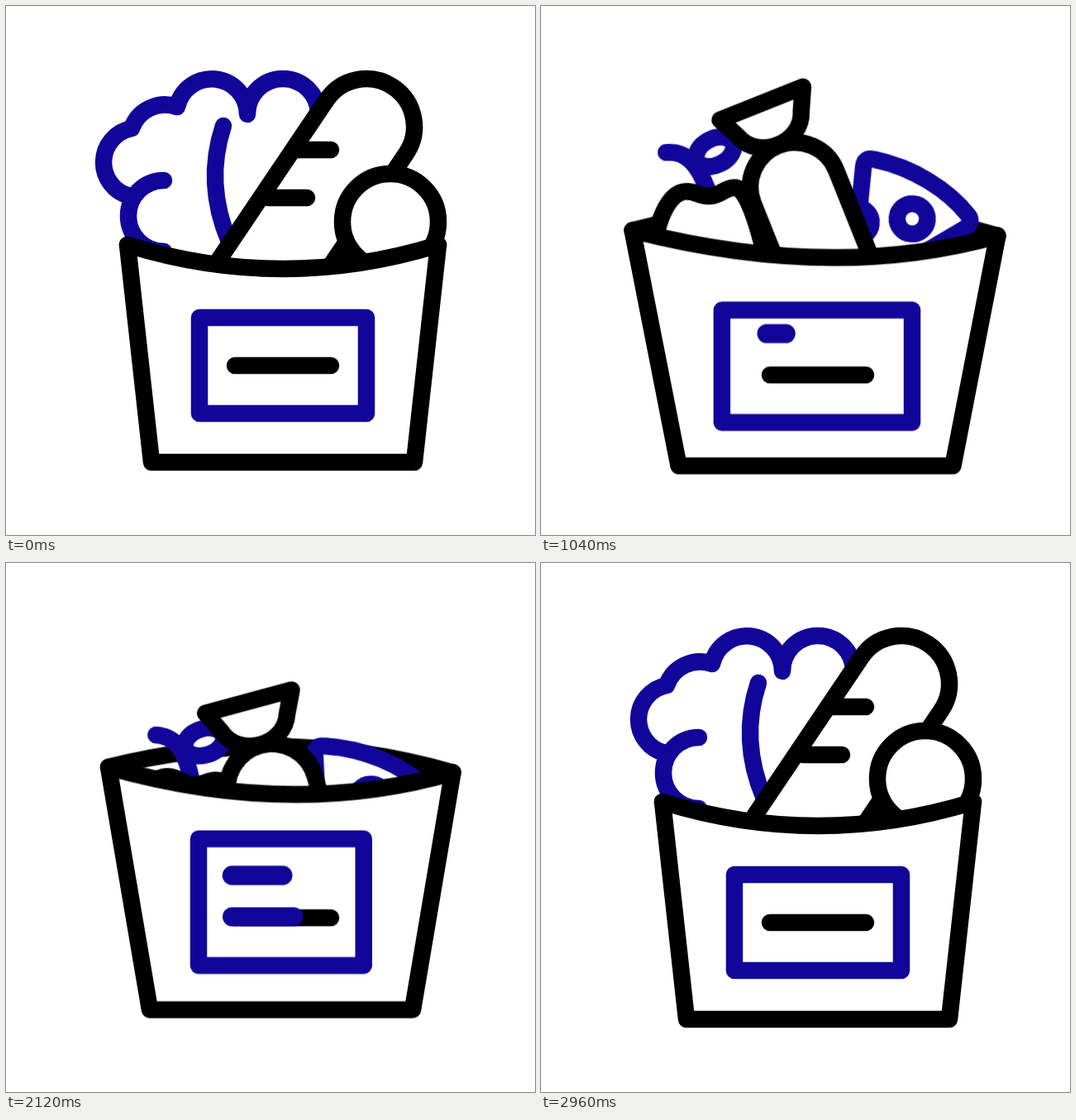
Animation of 640 by 640 pixels, one loop 3 s. Source, as an HTML page without scripts:

```html
<!DOCTYPE html>
<html lang="en">
<head>
<meta charset="utf-8">
<title>Shopping bag</title>
<style>
html, body { margin: 0; width: 100%; height: 100%; overflow: hidden; background: #fff; }
svg { display: block; width: 100%; height: 100%; }
svg * { animation: 3s linear infinite; }
.ink, .blue { fill: #fff; stroke: #000; stroke-width: 20.5; stroke-linecap: round; stroke-linejoin: round; }
.blue { stroke: #110699; }
.open { fill: none; }

/* Bag: vertical hop; everything inside is measured from its base */
.hop { animation-name: hop; }
@keyframes hop {
  0%, 6.667%, 98.667%, 100% { transform: translateY(552px); }
  6.667% { animation-timing-function: cubic-bezier(.3, .3, .5, 1); }
  16% { transform: translateY(517px); animation-timing-function: cubic-bezier(.5, .1, .7, .7); }
  26.667% { transform: translateY(543px); animation-timing-function: cubic-bezier(.2, .5, .5, 1); }
  43.333% { transform: translateY(560px); }
  45.333% { transform: translateY(559px); animation-timing-function: ease-in-out; }
  58.667% { transform: translateY(546px); }
  62.667% { transform: translateY(545px); animation-timing-function: ease-in-out; }
  78.667% { transform: translateY(536px); animation-timing-function: ease-in-out; }
}
.front { animation-name: front; }
@keyframes front {
  0%, 6.667%, 98.667%, 100% { d: path("M147 -263Q335 -205 523 -263L494 0L176 0Z"); }
  6.667% { animation-timing-function: ease-out; }
  16% { d: path("M109 -272Q350 -212 555 -264L503 0L162 0Z"); }
  22.667% { d: path("M104 -274Q350 -213 559 -266L504 0L161 0Z"); }
  26.667% { d: path("M106 -275Q350 -213 557 -267L503 0L162 0Z"); animation-timing-function: ease-in-out; }
  45.333% { d: path("M118 -301Q360 -238 545 -297L491 0L174 0Z"); }
  58.667%, 62.667% { d: path("M118 -301Q350 -239 545 -294L491 0L174 0Z"); }
  78.667% { d: path("M130 -286Q343 -223 536 -280L493 0L174 0Z"); animation-timing-function: ease-out; }
}
.back { animation-name: back; }
@keyframes back {
  0%, 6.667%, 98.667%, 100% { d: path("M147 -263Q335 -205 523 -263"); }
  6.667% { animation-timing-function: ease-out; }
  16% { d: path("M109 -272Q332 -334 555 -264"); }
  22.667% { d: path("M104 -274Q334 -338 559 -266"); }
  26.667% { d: path("M106 -275Q336 -339 557 -267"); animation-timing-function: ease-in-out; }
  45.333% { d: path("M118 -301Q332 -349 545 -297"); }
  58.667%, 62.667% { d: path("M118 -301Q332 -348 545 -294"); }
  78.667% { d: path("M130 -286Q333 -345 536 -280"); animation-timing-function: ease-out; }
}

/* Label */
.label { animation-name: label; }
@keyframes label {
  0%, 6.667%, 98.667%, 100% { x: 234px; y: -175px; width: 202px; height: 116px; }
  6.667% { animation-timing-function: ease-out; }
  16% { x: 210.5px; y: -169px; width: 249px; height: 116px; }
  26.667% { x: 210.5px; y: -172px; width: 249px; height: 119.5px; animation-timing-function: ease-in-out; }
  45.333%, 62.667% { x: 232.5px; y: -215.5px; width: 199.5px; height: 163px; }
  78.667% { x: 233.5px; y: -198px; width: 200px; height: 143.5px; }
}
.dash { animation-name: dash; }
@keyframes dash {
  0%, 6.667%, 98.667%, 100% { transform: translateY(-117px); }
  16% { transform: translateY(-111px); }
  26.667%, 62.667% { transform: translateY(-110px); }
  78.667% { transform: translateY(-112.5px); }
}
.row1 { animation-name: row1; }
@keyframes row1 {
  0%, 32% { d: path("M273 -160H273"); stroke-width: 0; }
  33.333% { stroke-width: 23; }
  45.333% { d: path("M273 -160H388"); }
  49.333%, 62.667% { d: path("M273 -160H394"); stroke-width: 23; }
  78.667% { d: path("M274 -165H276"); stroke-width: 24; }
  80%, 100% { d: path("M274 -165H274"); stroke-width: 0; }
}
.row2 { animation-name: row2; }
@keyframes row2 {
  0%, 34.667% { d: path("M273 -112H273"); stroke-width: 0; }
  36% { stroke-width: 23; }
  45.333% { d: path("M273 -112H359"); }
  50.667%, 62.667% { d: path("M273 -112H394"); stroke-width: 23; }
  78.667% { d: path("M274 -113H302"); stroke-width: 23; }
  81.333%, 100% { d: path("M274 -113H274"); stroke-width: 0; }
}

/* First shopping: lettuce, bread, roll */
.lettuce { animation-name: lettuce; }
@keyframes lettuce {
  0%, 6.667%, 98.667%, 100% { transform: none; visibility: visible; }
  6.667% { animation-timing-function: cubic-bezier(.35, .2, .7, .7); }
  16% { transform: translate(22px, 88px); visibility: visible; }
  21.333%, 78.667% { transform: translate(43px, 205px); visibility: hidden; }
  78.667% { animation-timing-function: cubic-bezier(.2, .6, .4, 1); }
}
.bread { transform-origin: 436px 146px; animation-name: bread; }
@keyframes bread {
  0%, 6.667%, 98.667%, 100% { transform: translate(0, 0) rotate(0deg); visibility: visible; }
  6.667% { animation-timing-function: cubic-bezier(.35, .2, .7, .7); }
  16% { transform: translate(-34px, 74px) rotate(-5deg); visibility: visible; }
  21.333%, 77.333% { transform: translate(-90px, 205px) rotate(-12deg); visibility: hidden; }
  78.667% { transform: translate(-84px, 187px) rotate(-11deg); visibility: visible; animation-timing-function: cubic-bezier(.2, .6, .4, 1); }
}
.roll { animation-name: roll; }
@keyframes roll {
  0%, 6.667%, 98.667%, 100% { transform: none; visibility: visible; }
  16% { transform: translate(-4px, 14px); visibility: visible; animation-timing-function: ease-in; }
  21.333%, 78.667% { transform: translate(-10px, 110px); visibility: hidden; }
  78.667% { animation-timing-function: cubic-bezier(.2, .6, .4, 1); }
}

/* Second shopping: pizza, apple, sausage */
.pizza { animation-name: pizza; }
@keyframes pizza {
  0%, 21.333% { transform: translate(415px, 390px) rotate(-6deg); visibility: hidden; }
  21.333% { animation-timing-function: ease-out; }
  26.667% { transform: translate(433px, 309px) rotate(-2deg); visibility: visible; animation-timing-function: cubic-bezier(.2, .6, .5, 1); }
  45.333% { transform: translate(454px, 242px) rotate(8deg); visibility: visible; animation-timing-function: ease-in-out; }
  58.667% { transform: translate(457px, 227px) rotate(0deg); }
  62.667% { transform: translate(457px, 225px) rotate(-1deg); visibility: visible; animation-timing-function: ease-in; }
  77.333%, 100% { transform: translate(415px, 390px) rotate(-6deg); visibility: hidden; }
}
.apple { animation-name: apple; }
@keyframes apple {
  0%, 21.333% { transform: translate(250px, 315px) rotate(10deg); visibility: hidden; }
  21.333% { animation-timing-function: ease-out; }
  26.667% { transform: translate(235px, 224px) rotate(3deg); visibility: visible; animation-timing-function: cubic-bezier(.2, .6, .5, 1); }
  45.333% { transform: translate(203px, 162px) rotate(-7deg); visibility: visible; animation-timing-function: ease-in-out; }
  58.667% { transform: translate(232px, 161px) rotate(0deg); }
  62.667% { transform: translate(234px, 159px) rotate(1deg); visibility: visible; animation-timing-function: ease-in; }
  77.333%, 100% { transform: translate(250px, 315px) rotate(10deg); visibility: hidden; }
}
.sausage { animation-name: sausage; }
@keyframes sausage {
  0%, 21.333% { transform: translate(332px, 408px) rotate(-12deg); visibility: hidden; }
  21.333% { animation-timing-function: ease-out; }
  26.667% { transform: translate(324px, 292px) rotate(-16deg); visibility: visible; animation-timing-function: cubic-bezier(.2, .6, .5, 1); }
  45.333% { transform: translate(302px, 197px) rotate(-23.5deg); visibility: visible; animation-timing-function: ease-in-out; }
  58.667% { transform: translate(315px, 197px) rotate(-17.3deg); }
  62.667% { transform: translate(316px, 194px) rotate(-17deg); visibility: visible; animation-timing-function: ease-in; }
  77.333%, 100% { transform: translate(332px, 408px) rotate(-12deg); visibility: hidden; }
}
</style>
</head>
<body>
<svg viewBox="0 0 640 640">
  <g class="hop"><path class="ink open back" d="M147 -263Q335 -205 523 -263"/></g>

  <g class="lettuce">
    <path class="blue" d="M191 211A43 43 0 0 0 191 297V325H330L378 131A43 43 0 0 0 292 131A43 43 0 0 0 207 122A43 43 0 0 0 152 148A42 42 0 0 0 150 230"/>
    <path class="blue open" d="M263 145C248 190 250 238 270 285"/>
  </g>
  <g class="bread">
    <path class="ink" transform="translate(436 146) rotate(34)" d="M-58 232V0A58 58 0 0 1 58 0V162"/>
    <path class="ink open" d="M352 174H393M318 232H364"/>
  </g>
  <circle class="ink roll" cx="465" cy="261" r="58"/>

  <g class="pizza">
    <path class="blue" d="M-65 100V-57Q-65 -69 -53 -67C-5 -62 40 -39 67 -11Q74 -3 65 5Z"/>
    <circle class="blue" r="18.3"/>
    <circle class="blue" cx="-67" cy="11" r="18.3"/>
  </g>
  <g class="apple">
    <path class="blue open" d="M-59 -4C-37 -4 -22 9 -11 51"/>
    <ellipse class="blue" rx="24" ry="16" transform="rotate(-22)"/>
    <path class="ink" d="M-86 129C-80 79 -60 45 -40 45C-26 45 -24 53 -10 53C4 53 6 45 20 45C34 45 44 90 50 129Z"/>
  </g>
  <g class="sausage">
    <path class="ink" d="M-54 -109H54L41 -82C29 -46 -29 -46 -41 -82Z"/>
    <path class="ink" d="M-54 100V0A54 54 0 0 1 54 0V120"/>
  </g>

  <g class="hop">
    <path class="ink front" d="M147 -263Q335 -205 523 -263L494 0L176 0Z"/>
    <rect class="blue label" x="234" y="-175" width="202" height="116"/>
    <path class="ink open dash" d="M277 0H393"/>
    <path class="blue open row1" d="M273 -160H273"/>
    <path class="blue open row2" d="M273 -112H273"/>
  </g>
</svg>
</body>
</html>
```
